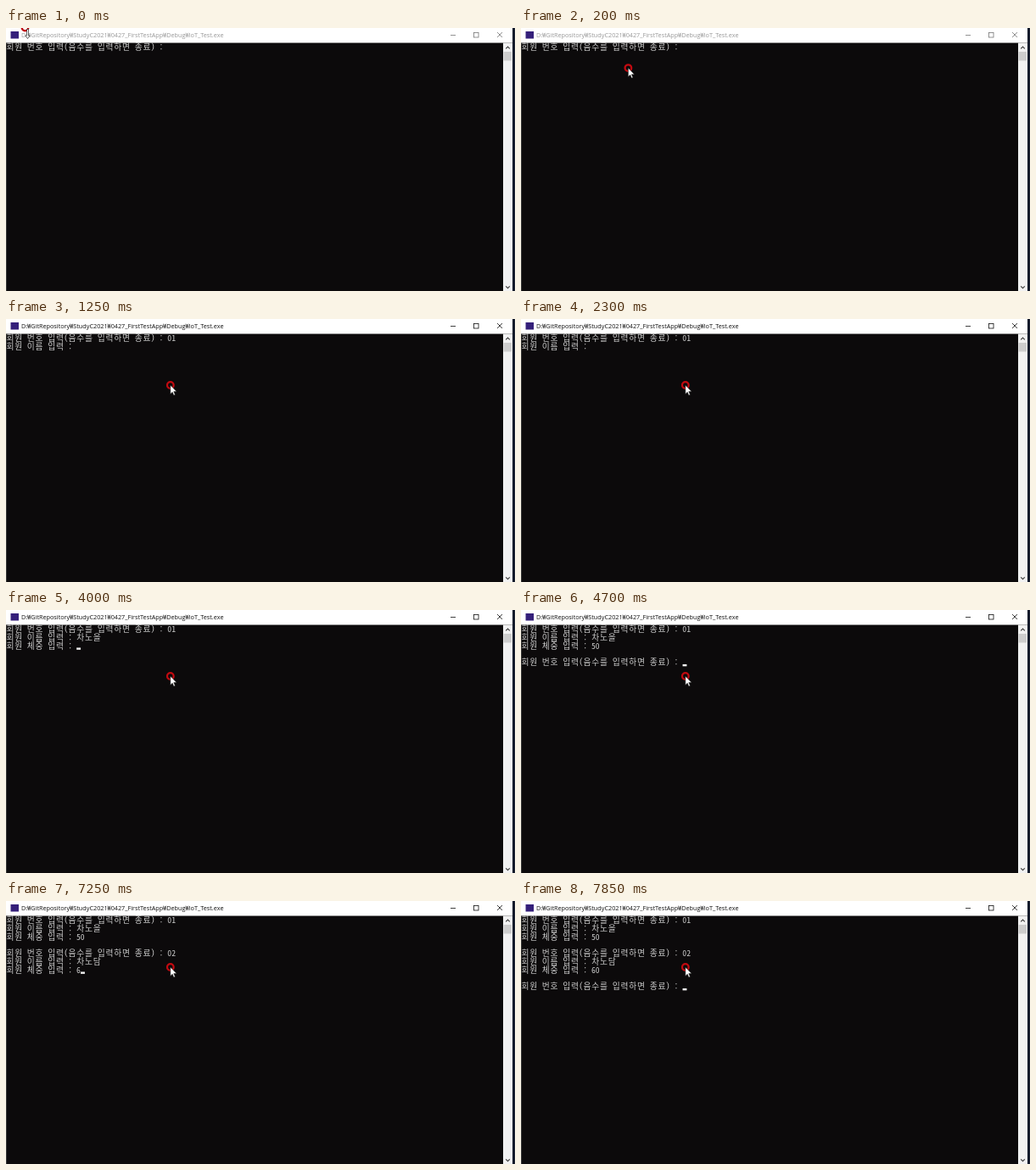
These frames come from a looping animation (600 px wide and 310 px high, 8 s). An HTML page:

```html
<!DOCTYPE html>
<html lang="ko">
<head>
<meta charset="utf-8">
<title>Console</title>
<style>
html, body { margin: 0; width: 100%; height: 100%; overflow: hidden; background: #0c0a0b; }
svg { display: block; }
#title { font-family: "Open Sans", "Noto Sans CJK KR", "Noto Sans CJK", sans-serif; }
#lines text {
  font: 300 9.76px "Noto Sans Mono CJK KR", "Noto Sans CJK KR", "Noto Sans CJK", monospace;
  fill: #ccc; text-anchor: middle;
}
</style>
</head>
<body>
<svg width="600" height="310" viewBox="0 0 600 310">
  <defs>
    <radialGradient id="glow">
      <stop offset=".46" stop-color="#0c0a0b"/>
      <stop offset=".56" stop-color="#5cc8dd"/>
      <stop offset=".72" stop-color="#2b94aa"/>
      <stop offset="1" stop-color="#14505e" stop-opacity="0"/>
    </radialGradient>
  </defs>
  <rect width="600" height="310" fill="#0c0a0b"/>
  <rect width="597" height="17.5" fill="#fff"/>
  <rect x="5.5" y="4" width="9.5" height="8.5" fill="#35207a"/>
  <text id="title" x="18" y="10.8" font-size="7">D:₩GitRepository₩StudyC2021₩0427_FirstTestApp₩Debug₩IoT_Test.exe</text>
  <g id="buttons" fill="none" stroke-width=".8">
    <path d="M524 8.5h6M579 5l6 6m0-6l-6 6"/>
    <rect x="551.5" y="5.5" width="5.5" height="5.5"/>
  </g>
  <rect x="586" y="17.5" width="11" height="293" fill="#f2f2f2"/>
  <rect x="586.6" y="28" width="9.4" height="10.5" fill="#cdcdcd"/>
  <path d="M589.2 24.3l2.3-2.3 2.3 2.3M589.2 304.3l2.3 2.3 2.3-2.3" fill="none" stroke="#404040" stroke-width="1.2"/>
  <rect x="597" width="3" height="310" fill="#141b2b"/>
  <rect y="17.5" width=".6" height="293" fill="#555"/>
  <g id="lines"></g>
  <rect id="caret" width="4.9" height="2.4" fill="#f2f2f2"/>
  <g id="mouse">
    <circle id="ring" r="3.8" fill="none" stroke="#c20a10" stroke-width="2.3"/>
    <circle id="halo" r="10.5" fill="url(#glow)"/>
    <path id="arrow" d="M0 0V10.4L2.4 8.2 4 12 5.6 11.3 4 7.6H7.3Z" fill="#fff" stroke="#111" stroke-width=".5"/>
    <path id="sizer" d="M2 2V9.5H.3L3 13 5.7 9.5H4V2Z" fill="#fff" stroke="#222" stroke-width=".7"/>
  </g>
</svg>
<script>
const LOOP = 8000, CELL = 4.88, ROW = 9.76, TOP = 17.9;
const $ = id => document.getElementById(id);
const NS = "http://www.w3.org/2000/svg";
const askNo = "회원 번호 입력(음수를 입력하면 종료) : ";
const askName = "회원 이름 입력 : ";
const askWeight = "회원 체중 입력 : ";

// time, appended output, caret shown
const events = [
  [0, askNo, 0], [900, "0", 1], [1050, "1", 1],
  [1250, "\n" + askName, 0], [1350, "", 1], [2300, "", 0],
  [2500, "차", 1], [2850, "", 0], [3050, "노", 1], [3350, "", 0],
  [3550, "을\n" + askWeight, 1], [4400, "5", 1], [4500, "0", 1],
  [4650, "\n\n" + askNo, 0], [4700, "", 1], [5150, "0", 1], [5250, "2", 1],
  [5400, "\n" + askName, 1], [5950, "차", 1], [6200, "노", 1], [6550, "담", 1],
  [6650, "\n" + askWeight, 1], [7250, "6", 1], [7350, "0", 1], [7600, "", 0],
  [7850, "\n\n" + askNo, 1]
];

const rows = Array.from({ length: 9 }, (_, i) => {
  const el = document.createElementNS(NS, "text");
  el.setAttribute("y", TOP + ROW * i + 8.2);
  return $("lines").appendChild(el);
});

const wide = ch => ch >= "가" && ch <= "힣" ? 2 : 1;
const columns = s => [...s].reduce((n, ch) => n + wide(ch), 0);

function centers(s) {
  let col = 0;
  return [...s].map(ch => {
    const x = (col + wide(ch) / 2) * CELL;
    col += wide(ch);
    return x.toFixed(2);
  }).join(" ");
}

function set(el, attrs) {
  for (const k in attrs) el.setAttribute(k, attrs[k]);
}
const show = (el, on) => set(el, { visibility: on ? "visible" : "hidden" });

let shown = null;
function drawConsole(t) {
  const past = events.filter(e => e[0] <= t);
  const out = past.map(e => e[1]).join("");
  const lines = out.split("\n");
  if (out !== shown) {
    rows.forEach((el, i) => {
      const s = lines[i] || "";
      el.textContent = s;
      set(el, { x: centers(s) });
    });
    shown = out;
  }
  const last = lines.length - 1;
  set($("caret"), { x: columns(lines[last]) * CELL + 0.2, y: TOP + ROW * last + 7 });
  show($("caret"), past[past.length - 1][2]);
}

function drawMouse(t) {
  const p = Math.min(1, t / 350);
  const e = p * p * (3 - 2 * p);
  const x = 22.5 + 171.3 * e, y = -0.5 + 78.5 * e;
  set($("mouse"), { transform: `translate(${x} ${y})` });
  const click = t >= 400 && t < 750;
  const grow = Math.max(0, (t - 450) / 300);
  show($("halo"), click);
  set($("halo"), { transform: `scale(${1 + grow * 0.5})`, opacity: 1 - grow });
  show($("ring"), !click || t >= 650);
  show($("sizer"), t < 50);
  show($("arrow"), t >= 50);
}

function draw(t) {
  const active = t >= 400;
  set($("title"), { fill: active ? "#111" : "#999" });
  set($("buttons"), { stroke: active ? "#111" : "#777" });
  drawConsole(t);
  drawMouse(t);
}

// pick the type size that gives the caption its length in any fallback font
set($("title"), { "font-size": 7 * 239 / $("title").getComputedTextLength() });

const start = performance.now();
function tick() {
  const t = (performance.now() - start) % LOOP;
  draw(Math.floor(t / 50) * 50);
  requestAnimationFrame(tick);
}
draw(0);
requestAnimationFrame(tick);
</script>
</body>
</html>
```
